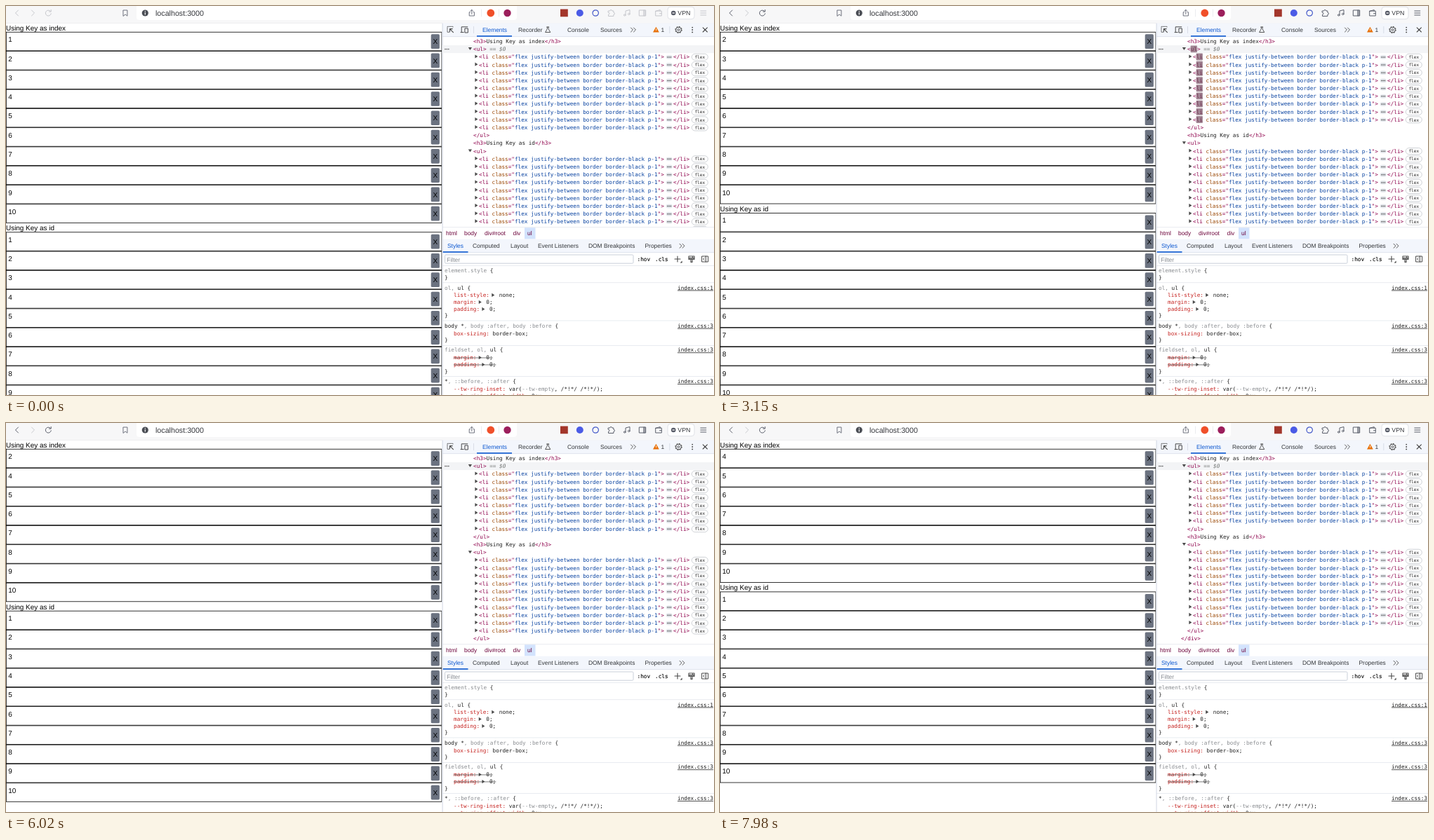
Recreate the animation shown at these times as an HTML page. Size 1009 by 555 pixels, loop 8 s.

```html
<!DOCTYPE html>
<html lang="en">
<head>
<meta charset="utf-8">
<title>List keys</title>
<style>
html, body { margin: 0; width: 100%; height: 100%; overflow: hidden; background: #fff; }
svg { display: block; width: 100%; height: 100%; }
text { white-space: pre; text-rendering: geometricPrecision; font-family: "Liberation Sans", Arial, sans-serif; }
.mono { font-family: "DejaVu Sans Mono", monospace; }
.line { fill: none; stroke-linecap: round; stroke-linejoin: round; }
.tool { stroke: var(--tool); }
.tag-box { fill: var(--flash-bg); }
.tag-name { fill: var(--flash-fg); }
</style>
</head>
<body>
<svg id="stage" viewBox="0 0 1009 555">
  <defs>
    <clipPath id="treeClip"><rect x="622" y="44" width="387" height="271"/></clipPath>
    <pattern id="hatch" width="7" height="7" patternUnits="userSpaceOnUse">
      <path d="M1 1L5 5" stroke="#5f52a8" stroke-width=".8"/>
    </pattern>
    <filter id="shadow" x="-10%" y="-30%" width="120%" height="170%">
      <feDropShadow dx="0" dy="1" stdDeviation="1.6" flood-opacity=".35"/>
    </filter>
  </defs>
  <g id="page"></g>
  <g id="overlay"></g>
  <g id="chrome"></g>
  <g id="tree" clip-path="url(#treeClip)"></g>
</svg>
<script>
const LOOP = 8000, FOCUS = 1400, FADE = 1470;
const HOVER = [7140, 7280];
const CHAR = 4.64, MONO = 7.7, UI = 8.42, PAGE = 9.93;
const ROW = 27.28, LIST_TOP = 36.9, HEAD = 12.7, LINE = 11.19;
const TAG = '#8e004b', ATTR = '#994500', VALUE = '#0842a0', INK = '#1f1f1f', GREY = '#8a8d91', BLUE = '#0b57d0';

const numbers = (from, to) => Array.from({ length: to - from + 1 }, (_, i) => from + i);
// start time, rows left in the first list, first row flashing in the tree
const phases = [
  { start: 0, items: numbers(1, 10), flash: Infinity },
  { start: 2380, items: numbers(2, 10), flash: 0 },
  { start: 4480, items: [2, ...numbers(4, 10)], flash: 1 },
  { start: 6510, items: numbers(4, 10), flash: 0 },
];

const byId = id => document.getElementById(id);
const rect = (x, y, w, h, fill, more = '') => `<rect x="${x}" y="${y}" width="${w}" height="${h}" fill="${fill}" ${more}/>`;
const dot = (x, y, r, fill, more = '') => `<circle cx="${x}" cy="${y}" r="${r}" fill="${fill}" ${more}/>`;
const path = (d, stroke, width = 1, more = '') => `<path class="line" d="${d}" stroke="${stroke}" stroke-width="${width}" ${more}/>`;
const tool = d => `<path class="line tool" d="${d}"/>`;
const shape = (d, fill) => `<path d="${d}" fill="${fill}"/>`;
const escape = s => String(s).replace(/&/g, '&amp;').replace(/</g, '&lt;');
// y is the middle of the capitals
const text = (x, y, s, size = UI, fill = INK, more = '') =>
  `<text x="${x}" y="${(y + size * .36).toFixed(2)}" font-size="${size}" fill="${fill}" ${more}>${escape(s)}</text>`;
const code = (x, y, ...parts) =>
  `<text class="mono" x="${x}" y="${(y + MONO * .36).toFixed(2)}" font-size="${MONO}">` +
  parts.map(([s, fill, more = '']) => `<tspan fill="${fill}" ${more}>${escape(s)}</tspan>`).join('') + '</text>';
const right = (x, y) => shape(`M${x} ${y - 2.6}l4 2.6l-4 2.6z`, '#4a4a4a');
const down = (x, y) => shape(`M${x} ${y - 2}h5.2l-2.6 4z`, '#4a4a4a');

function drawPage(items) {
  const list = (rows, top) => rows.map((n, i) => {
    const y = top + i * ROW;
    return rect(.35, y + .35, 620.6, ROW - .7, '#fff', 'stroke="#000" stroke-width=".8"') +
      text(3.2, y + 10.8, n, PAGE, '#000') +
      rect(605.7, y + 3.4, 12.2, 20.7, '#6b7280', 'rx="1.6"') +
      text(611.8, y + 13.8, 'X', PAGE, '#000', 'text-anchor="middle"');
  }).join('');
  const end = LIST_TOP + items.length * ROW;
  return text(0, 31, 'Using Key as index', PAGE, '#000') + list(items, LIST_TOP) +
    text(0, end + 6.9, 'Using Key as id', PAGE, '#000') + list(numbers(1, 10), end + HEAD);
}

function drawTree(count, flash) {
  let k = 0, out = '';
  const nextY = () => 50.2 + LINE * k++;
  const open = (x, y, name, lit, ...rest) =>
    (lit ? `<rect class="tag-box" x="${x + CHAR}" y="${y - 5}" width="${CHAR * 2}" height="9.8" rx="1"/>` : '') +
    code(x, y, ['<', TAG], [name, TAG, lit ? 'class="tag-name" style="fill:var(--flash-fg)"' : ''], ...rest);
  const item = lit => {
    const y = nextY();
    return right(668.4, y - .6) +
      open(674, y, 'li', lit, [' class', ATTR], ['="', TAG],
        ['flex justify-between border border-black p-1', VALUE], ['">', TAG]) +
      rect(941, y - 2.4, 8.4, 5.4, '#dfe3e8', 'rx="2"') +
      [943, 945.2, 947.4].map(x => dot(x, y + .3, .75, '#444')).join('') +
      code(951, y, ['</li>', TAG]) +
      rect(977.3, y - 4.3, 23, 9, '#fff', 'rx="4.5" stroke="#c3c7cc" stroke-width=".8"') +
      text(988.8, y + .2, 'flex', 6.1, INK, 'class="mono" text-anchor="middle"');
  };
  const heading = label => code(666, nextY(), ['<h3>', TAG], [label, INK], ['</h3>', TAG]);
  const list = (rows, lit, from, note) => {
    const y = nextY();
    out += down(658.8, y - .3) + open(666, y, 'ul', lit, ['>', TAG], ...note);
    for (let i = 0; i < rows; i++) out += item(i >= from);
    out += code(666, nextY(), ['</ul>', TAG]);
  };
  out += '<rect x="622" y="56" width="387" height="11.2" fill="var(--row)"/>';
  out += `<rect id="hoverRow" x="622" y="${(50.2 + LINE * 20 - 5.5).toFixed(2)}" width="387" height="11.2" fill="#f1f3f5"/>`;
  out += [626, 628.4, 630.8].map(x => dot(x, 61.6, .8, '#444')).join('');
  out += heading('Using Key as index');
  list(count, flash < count, flash, [[' == $0', '#747775', 'font-style="italic"']]);
  out += heading('Using Key as id');
  list(10, false, Infinity, []);
  return out + code(657, nextY(), ['</div>', TAG]);
}

function drawToolbar() {
  const dark = '#5f6370';
  return rect(0, 0, 1009, 24.4, '#f7f7f8') + rect(186, -5, 542, 25, '#fff', 'rx="4"') +
    tool('M17.5 6l-4 4l4 4') + path('M36.5 6l4 4l-4 4', '#c9cacf') +
    tool('M63.5 7.6a4 4 0 1 0 .8 3.2M64.2 5.4v2.7h-2.7') +
    path('M167.3 6h5.6v8.2l-2.8-2.2l-2.8 2.2z', dark, .9) +
    dot(198.3, 10, 4.6, '#4b4e55') + rect(197.7, 9.3, 1.2, 3.2, '#fff') + dot(198.3, 7.7, .7, '#fff') +
    text(213, 10, 'localhost:3000', 10.7, '#34363b') +
    path('M661.5 8.8h-1.3v5.2h7.2v-5.2h-1.3M663.8 11.5v-6M661.9 7.2l1.9-1.9l1.9 1.9', dark, .9) +
    path('M677.5 5v10M702.5 5v10', '#e3e4e8', .7) +
    dot(690.8, 10, 5.4, '#f0502a') + dot(714.5, 10, 5.2, '#9c1f5c') +
    rect(790, 4.5, 10.8, 10.8, '#a3362b') + dot(817.8, 10, 5, '#4b5be6') +
    dot(840.2, 10, 4.2, 'none', 'stroke="#4459c9" stroke-width="1.2"') +
    tool('M858.5 7h2.2a1.5 1.5 0 0 1 3 0h2.2v2.3a1.5 1.5 0 0 1 0 3v2.2h-7.4v-2.3a1.5 1.5 0 0 0 0-3z') +
    tool('M883 13V7l6-1.5v6M883 13a1.3 1.1 0 1 1-2.6 0a1.3 1.1 0 1 1 2.6 0M889 11.5a1.3 1.1 0 1 1-2.6 0a1.3 1.1 0 1 1 2.6 0') +
    tool('M902.7 6h9v8h-9zM908.8 6v8M910.2 6v8') +
    tool('M925.7 7.5v6.5h8.6v-6.5zM925.7 7.5l6.5-2v2M931.5 10.7h2.8') +
    rect(943, 1.2, 38, 17.5, '#fff', 'rx="4" stroke="#d9dbe1" stroke-width=".8"') +
    dot(951.2, 10, 3.3, '#565a66') + rect(949.5, 9.4, 3.4, 1.2, '#fff') +
    text(957.3, 10, 'VPN', 8.8, '#34363b') +
    tool('M989.8 7h8M989.8 10h8M989.8 13h8') + rect(0, 24, 1009, .6, '#e6e7ea');
}

function drawDevtools() {
  const bar = '#f3f6fc', edge = '#d5dbe7', icon = '#474747';
  const labels = (y, rows) => rows.map(([x, s, fill]) => text(x, y, s, UI, fill || '#333639')).join('');
  const more = (x, y) => path(`M${x} ${y - 3}l3 3l-3 3M${x + 4} ${y - 3}l3 3l-3 3`, icon, .9);
  const rule = y => rect(622, y, 387, .7, '#dfe3ea');
  const link = (y, n) => text(957, y, 'index.css:' + n, MONO, INK, 'class="mono" text-decoration="underline"');
  const close = y => code(625, y, ['}', INK]);
  const prop = (y, name, value, struck) =>
    code(638, y, [name + ':', '#c5221f'], [(value.arrow ? '   ' : ' ') + value.s + ';', INK]) +
    (value.arrow ? right(638 + (name.length + 2) * CHAR - 1.4, y) : '') +
    (struck ? rect(638, y, (name.length + 6) * CHAR, .7, '#444') : '');
  const short = s => ({ s, arrow: true });

  const tabs = rect(622, 24.6, 387, 19, bar) + rect(622, 43.4, 387, .7, edge) +
    path('M637 30v-0.7h-8v8h3', icon, .8, 'stroke-dasharray="1.6 1"') +
    path('M632.6 32.8l4.8 4.8M632.4 36.4v-3.8h3.8', icon, 1.1) +
    path('M649.2 36.8v-7h8.6M648 37.6h4.2M654.3 32h4v6h-4z', icon) +
    rect(666, 29, .7, 10, '#cdd3df') +
    labels(34, [[679, 'Elements', BLUE], [730, 'Recorder'], [800, 'Console'], [847, 'Sources'], [933.5, '1']]) +
    rect(671, 42.2, 50, 1.6, BLUE) +
    path('M770.7 30h3M771.3 30v2.8l-2.7 4.7h7.2l-2.7-4.7v-2.8', icon, .9) + more(890.5, 34) +
    shape('M926.4 29.8l4.4 7.8h-8.8z', '#e8710a') + rect(926, 32.4, .9, 2.7, '#fff') +
    rect(945.5, 29, .7, 10, '#cdd3df') +
    dot(958.5, 34, 3.8, 'none', `stroke="${icon}" stroke-width="1.1"`) +
    dot(958.5, 34, 4.7, 'none', `stroke="${icon}" stroke-width="1" stroke-dasharray="1.8 1.89"`) +
    dot(958.5, 34, 1.4, 'none', `stroke="${icon}" stroke-width=".9"`) +
    [30.6, 34, 37.4].map(y => dot(978.2, y, .95, icon)).join('') +
    path('M993.2 30.8l6.2 6.2M999.4 30.8l-6.2 6.2', icon, 1.1);

  const crumbs = rect(622, 315, 387, 18, '#fff') + rule(315.4) + rect(739, 316.3, 15.5, 16.2, '#d3e3fd') +
    labels(324.3, [[627, 'html', '#6b0039'], [653, 'body', '#6b0039'], [682, 'div#root', '#6b0039'],
      [722.5, 'div', '#6b0039'], [743, 'ul', '#6b0039']]);

  const panes = rect(622, 332.7, 387, 19, bar) + rect(622, 351.4, 387, .7, edge) +
    labels(342.3, [[629, 'Styles', BLUE], [665, 'Computed'], [719, 'Layout'], [758, 'Event Listeners'],
      [830, 'DOM Breakpoints'], [910.5, 'Properties']]) +
    rect(622.5, 350.2, 36, 1.6, BLUE) + more(960, 342.3);

  const filter = rect(625.5, 355, 268.5, 12.2, '#fff', 'rx="1.5" stroke="#bcc3d0" stroke-width=".8"') +
    text(628.3, 361.5, 'Filter', UI, '#858a91') +
    text(899.5, 361.2, ':hov', MONO, INK, 'class="mono" stroke="#1f1f1f" stroke-width=".2"') +
    text(925, 361.2, '.cls', MONO, INK, 'class="mono" stroke="#1f1f1f" stroke-width=".2"') +
    path('M957 357v8M953 361h8', icon, 1.1) + shape('M963.6 363.6v3h-3z', icon) +
    path('M973 357h8v4.4h-8zM973 359.6h8M976 361.4v4h2v-4M978.6 357v1.4', icon, 1.1) +
    path('M992 357h8.6v8h-8.6zM997.4 357v8M995.2 359.4l-1.6 1.6l1.6 1.6', icon, 1);

  const styles = rule(370) +
    code(625, 377, ['element.style', GREY], [' {', INK]) + close(387.6) + rule(394.4) +
    code(625, 401.8, ['ol, ', GREY], ['ul {', INK]) + link(401.8, 1) +
    prop(412.4, 'list-style', short('none')) + prop(422.4, 'margin', short('0')) +
    prop(432.4, 'padding', short('0')) + close(441.6) + rule(448.6) +
    code(625, 456, ['body *', INK], [', body :after, body :before', GREY], [' {', INK]) + link(456, 3) +
    prop(467, 'box-sizing', { s: 'border-box' }) + close(476.6) + rule(484) +
    code(625, 490.6, ['fieldset, ol, ', GREY], ['ul {', INK]) + link(490.6, 3) +
    prop(501.6, 'margin', short('0'), true) + prop(511.6, 'padding', short('0'), true) +
    close(521) + rule(528) +
    code(625, 535.2, ['*', INK], [', ::before, ::after', GREY], [' {', INK]) + link(535.2, 3) +
    code(638, 546.2, ['--tw-ring-inset:', '#c5221f'], [' var(', INK], ['--tw-empty', GREY], [', /*!*/ /*!*/);', INK]) +
    prop(556, '--tw-ring-offset-width', { s: '0px' });

  return rect(621.4, 24.6, 387.6, 531, '#fff') + tabs + crumbs + panes + filter + styles +
    rect(621.6, 24.6, .9, 531, '#cbd2df');
}

function drawOverlay() {
  const y = LIST_TOP + 7 * ROW + HEAD + 4 * ROW;
  const dashes = 'stroke="#6a4fd0" stroke-width=".9" stroke-dasharray="2.4 1.8"';
  const space = [10, y + 3.4, 596, 20.7];
  return rect(0, y, 621, ROW, '#c9cbb0') + rect(.7, y + .7, 619.6, ROW - 1.4, '#b7c9ae') +
    rect(3.5, y + 3.4, 614.4, 20.7, '#a3bfe2') + rect(605.7, y + 3.4, 12.2, 20.7, '#7c95b8') +
    text(3.2, y + 10.8, '5', PAGE, '#44607f') +
    text(611.8, y + 13.8, 'X', PAGE, '#44607f', 'text-anchor="middle"') +
    rect(...space, '#9b90e6') + rect(...space, 'url(#hatch)') +
    rect(3.5, y + 3.4, 614.4, 20.7, 'none', dashes) + path(`M10 ${y + 3.4}v20.7M606 ${y + 3.4}v20.7`, '#6a4fd0', .8) +
    `<path d="M3 313h207a2 2 0 0 1 2 2v27.500a2 2 0 0 1 -2 2h-190l-6 5l-6-5h-5a2 2 0 0 1 -2-2v-27.500a2 2 0 0 1 2-2z" fill="#fff" filter="url(#shadow)"/>` +
    path('M8 324.600h4.500v3h-4.500zM14.500 324.600h4v3h-4zM8 329.800h3v3h-3zM13 329.800h5.500v3h-5.500z', '#3b78e7', .9) +
    text(26, 323.2, 'li.flex.justify-between.border.bo', 9.1, '#1a1a7a', 'font-weight="bold"') +
    text(26, 334.4, 'rder-black.p-1', 9.1, '#1a1a7a', 'font-weight="bold"') +
    text(171.5, 328.8, '887 × 39', UI, '#333');
}

const flashBack = [[0, 142, 0, 75], [.43, 150, 95, 120], [.52, 160, 132, 147], [1, 255, 255, 255]];
const flashText = [[0, 255, 255, 255], [.43, 138, 80, 105], [.52, 112, 48, 78], [1, 142, 0, 75]];
function colorAt(stops, p) {
  const i = Math.max(1, stops.findIndex(s => s[0] >= p));
  const [a, b] = [stops[i - 1], stops[i]];
  const u = (p - a[0]) / (b[0] - a[0]);
  return `rgb(${[1, 2, 3].map(c => Math.round(a[c] + (b[c] - a[c]) * u))})`;
}

const stage = byId('stage'), overlay = byId('overlay');
byId('chrome').innerHTML = drawToolbar() + drawDevtools();
overlay.innerHTML = drawOverlay();

let shown = null;
function render(t) {
  const phase = phases.findLast(p => t >= p.start);
  if (phase !== shown) {
    byId('page').innerHTML = drawPage(phase.items);
    byId('tree').innerHTML = drawTree(phase.items.length, phase.flash);
    shown = phase;
  }
  const p = Math.min(1, (t - phase.start) / FADE);
  const set = (name, value) => stage.style.setProperty(name, value);
  set('--flash-bg', p < 1 ? colorAt(flashBack, p) : 'transparent');
  set('--flash-fg', colorAt(flashText, p));
  set('--tool', t < FOCUS ? '#c6c7cc' : '#5b5f6b');
  set('--row', t >= FOCUS && t < phases[1].start ? '#d3e3fd' : '#f3f4f6');
  const hovering = t >= HOVER[0] && t < HOVER[1] ? 'inline' : 'none';
  overlay.style.display = byId('hoverRow').style.display = hovering;
}

const begin = performance.now();
function tick() {
  render((performance.now() - begin) % LOOP);
  requestAnimationFrame(tick);
}
tick();
</script>
</body>
</html>
```
